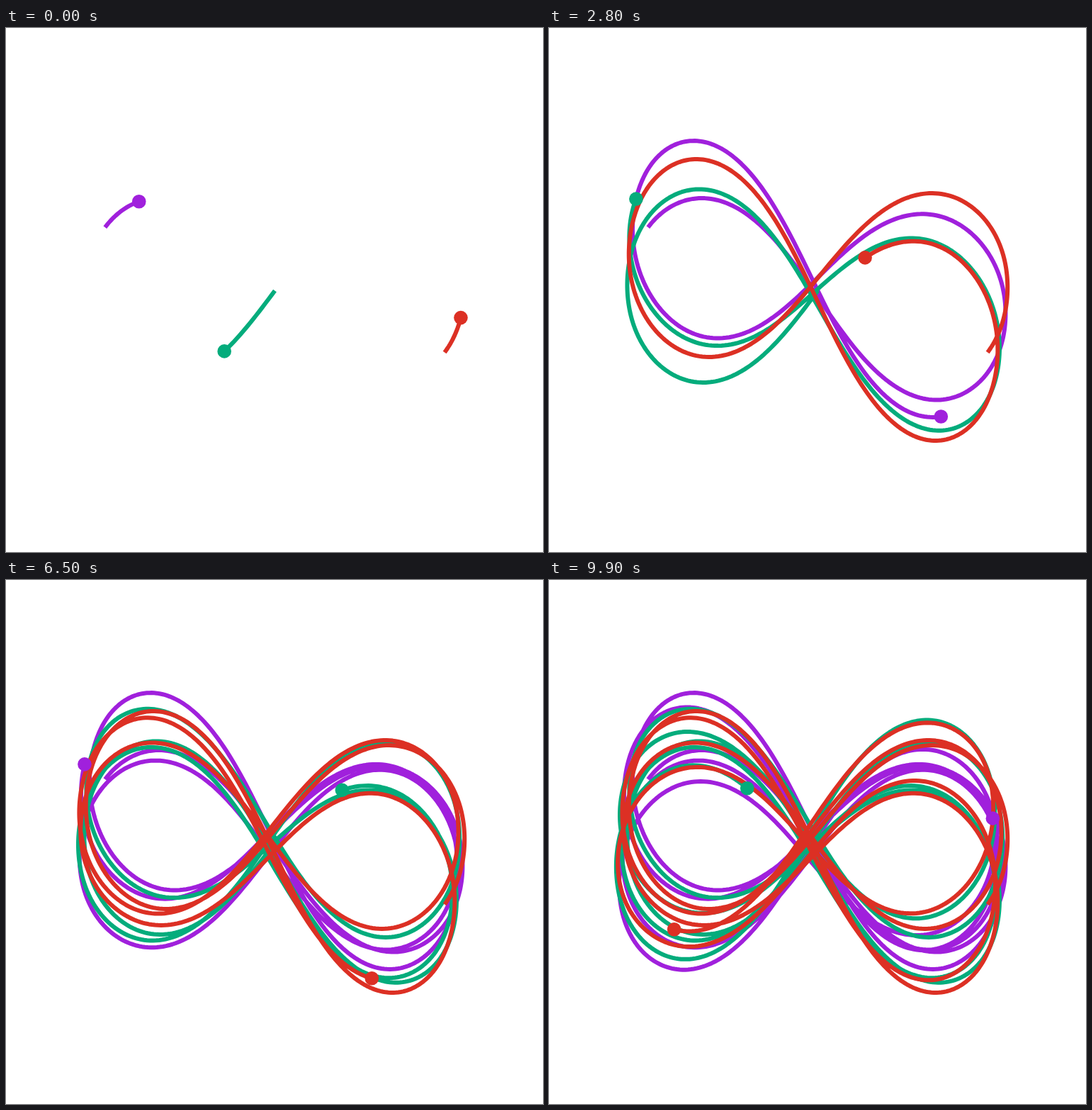
Write an HTML page with a canvas that moves like this. It is 758 px wide and 739 px high and loops after 10000 ms.

```html
<!DOCTYPE html>
<html lang="en">
<head>
<meta charset="utf-8">
<title>Three-body figure eight</title>
<style>
html, body { margin: 0; width: 100%; height: 100%; overflow: hidden; background: #fff; }
canvas { display: block; }
</style>
</head>
<body>
<canvas id="stage" width="758" height="739"></canvas>
<script>
const FRAMES = 100, FRAME_MS = 100, SUB = 16;
const PERIOD = 22.48; // one trip round the eight, in frames
const ROCK = 43.6;    // one swing of the whole figure, in frames
const WIDTH = 273, HEIGHT = 127;

// Phase: head start on the eight, as a part of the period.
const BODIES = [
  { color: '#a020dc', phase: 1 / 3 },
  { color: '#04ac7c', phase: 0 },
  { color: '#dc3024', phase: 2 / 3 }
];

const { sin, cos, PI } = Math;
const swing = (t, peak, period) => cos(2 * PI * (t - peak) / period);

// How far the right end dips: a rocking motion on a slow backward turn.
const tiltAt = t =>
  58 - 0.0074 * t * t + 65.5 * swing(t, 23, ROCK) + 9.2 * swing(t, 9, 47);

function place(phase, t) {
  const a = 2 * PI * (t / PERIOD + phase);
  const tilt = tiltAt(t);
  const bulge = 18.5 * swing(t, 33, ROCK); // one lobe swells, the other shrinks
  const shrink = 1 - 0.26 * (tilt / WIDTH) ** 2;
  return [
    379.5 - 0.186 * t
      - WIDTH * shrink * (sin(a) - 0.018 * sin(5 * a))
      - (1.5 + 0.1 * tilt) * sin(2 * a),
    369.7 + 0.045 * t
      + HEIGHT * (sin(2 * a) + 0.173 * sin(4 * a))
      - tilt * sin(a) + bulge * cos(a)
  ];
}

const paths = BODIES.map(({ phase }) =>
  Array.from({ length: FRAMES * SUB + 1 }, (_, k) => place(phase, k / SUB)));

const ctx = document.getElementById('stage').getContext('2d');
ctx.lineWidth = 6;
ctx.lineJoin = 'round';

function draw(frame) {
  const end = (frame + 1) * SUB;
  ctx.fillStyle = '#fff';
  ctx.fillRect(0, 0, 758, 739);
  paths.forEach((path, i) => {
    ctx.strokeStyle = BODIES[i].color;
    ctx.beginPath();
    for (let k = 0; k <= end; k++) ctx.lineTo(...path[k]);
    ctx.stroke();
  });
  paths.forEach((path, i) => {
    ctx.fillStyle = BODIES[i].color;
    ctx.beginPath();
    ctx.arc(...path[end], 9.8, 0, 2 * PI);
    ctx.fill();
  });
}

const begin = performance.now();
let shown = 0;
draw(0);

function tick() {
  const frame = Math.floor((performance.now() - begin) / FRAME_MS) % FRAMES;
  if (frame !== shown) draw(shown = frame);
  requestAnimationFrame(tick);
}
requestAnimationFrame(tick);
</script>
</body>
</html>
```
